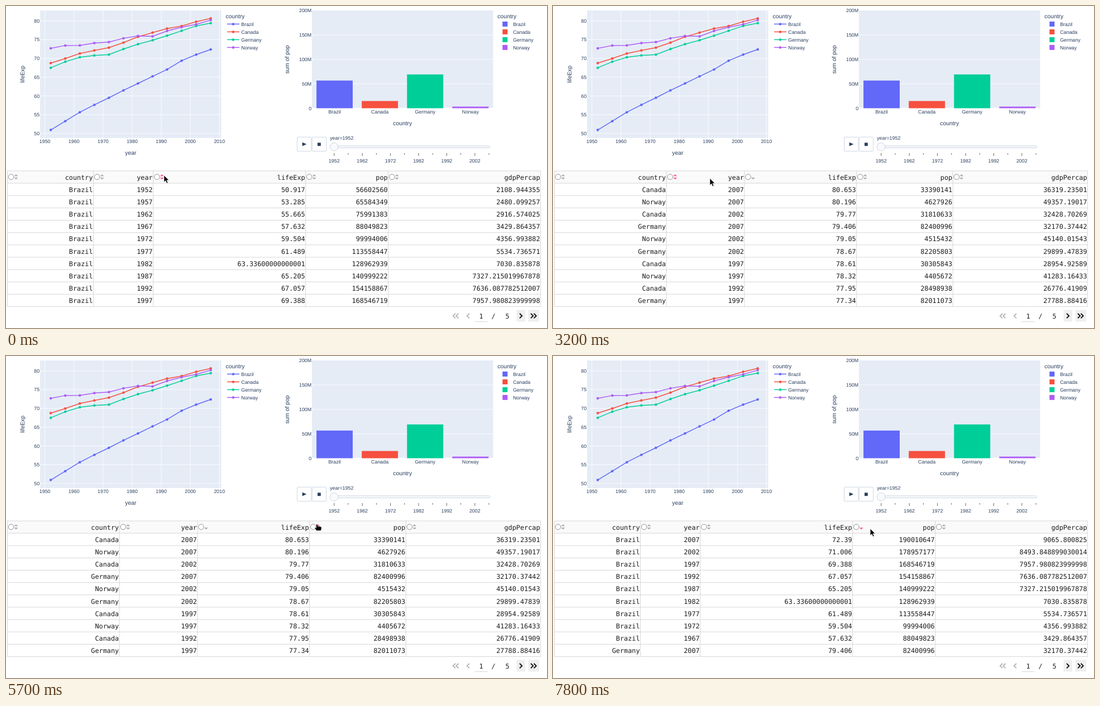
These frames come from a looping animation (969x578 px, 8 s). An HTML page:

```html
<!DOCTYPE html>
<html lang="en">
<head>
<meta charset="utf-8">
<title>Life expectancy dashboard</title>
<style>
html, body { margin: 0; width: 100%; height: 100%; overflow: hidden; background: #fff; }
svg { display: block; width: 969px; height: 578px; }
text { font-family: "Liberation Sans", Arial, sans-serif; font-size: 8.87px; fill: #2a3f5f; text-rendering: geometricPrecision; }
.title { font-size: 10.35px; }
.mono text { font-family: "DejaVu Sans Mono", monospace; font-size: 11.83px; fill: #1c1c1c; }
</style>
</head>
<body>
<svg viewBox="0 0 969 578">
  <g id="charts"></g>
  <g id="table" class="mono"></g>
  <g id="pager" class="mono"></g>
  <g id="cursor"></g>
</svg>
<script>
const LOOP = 8000, STEP = 100;
const $ = id => document.getElementById(id);

// colour, life expectancy every five years, then population and GDP at the KEYS
const KEYS = [0, 3, 6, 9, 11];
const DATA = {
  Brazil: ['#6268f7', '50.917 53.285 55.665 57.632 59.504 61.489 63.33600000000001 65.205 67.057 69.388 71.006 72.39',
    [56602560, 88049823, 128962939, 168546719, 190010647],
    [2108.944355, 3429.864357, 7030.835878, 7957.980823999998, 9065.800825]],
  Canada: ['#f6503f', '68.75 69.96 71.3 72.13 72.88 74.21 75.76 76.86 77.95 78.61 79.77 80.653',
    [14785584, 20819767, 25201900, 30305843, 33390141],
    [11367.16112, 16076.58803, 22898.79214, 28954.92589, 36319.23501]],
  Germany: ['#00ce98', '67.5 69.1 70.3 70.8 71.0 72.5 73.8 74.847 76.07 77.34 78.67 79.406',
    [69145952, 76368453, 78335266, 82011073, 82400996],
    [7144.114393, 14745.62561, 22031.53274, 27788.88416, 32170.37442]],
  Norway: ['#ad5cf5', '72.67 73.44 73.47 74.08 74.34 75.37 75.97 75.89 77.32 78.32 79.05 80.196',
    [3327728, 3786019, 4114787, 4405672, 4627926],
    [10095.42172, 16361.87647, 26298.63531, 41283.16433, 49357.19017]]
};
const FIELDS = ['country', 'year', 'lifeExp', 'pop', 'gdpPercap'];

// constant growth rate between neighbouring keys
function grow(values, i) {
  const k = KEYS.findIndex(key => key >= i);
  if (KEYS[k] === i) return values[k];
  const f = (i - KEYS[k - 1]) / (KEYS[k] - KEYS[k - 1]);
  return values[k - 1] * (values[k] / values[k - 1]) ** f;
}
const gdpPlaces = (name, i) => name !== 'Brazil' ? 5 : i > 6 && i < 11 ? 12 : 6;

const series = Object.entries(DATA).map(([name, [color, life, pop, gdp]]) =>
  ({ name, color, life: life.split(' '), pop, gdp }));
const rows = series.flatMap(({ name, life, pop, gdp }) => life.map((v, i) =>
  [name, 1952 + 5 * i, v, Math.round(grow(pop, i)), grow(gdp, i).toFixed(gdpPlaces(name, i))]));

const text = (x, y, s, anchor = 'start', extra = '') =>
  `<text x="${x}" y="${y}" text-anchor="${anchor}" ${extra}>${s}</text>`;
const rect = (x, y, w, h, fill, extra = '') =>
  `<rect x="${x}" y="${y}" width="${w}" height="${h}" fill="${fill}" ${extra}/>`;
const path = (d, stroke, width = 1, fill = 'none') =>
  `<path d="${d}" stroke="${stroke}" stroke-width="${width}" fill="${fill}"/>`;
const dot = (x, y, r, fill, extra = '') => `<circle cx="${x}" cy="${y}" r="${r}" fill="${fill}" ${extra}/>`;
const big = 'class="title"';
const turned = (x, y, s) => text(0, 0, s, 'middle', `${big} transform="translate(${x} ${y}) rotate(-90)"`);
const legendY = i => 32.4 + 14 * i;

function lineChart() {
  const px = year => 69.7 + (year - 1950) * 5.21;
  const py = v => 228.8 - (v - 50) * 6.737;
  let out = rect(61, 8, 324.5, 229, '#e5ecf6');
  for (let y = 1950; y <= 2010; y += 10)
    out += path(`M${px(y)} 8V237`, '#fff', .8) + text(px(y), 246.4, y, 'middle');
  for (let v = 50; v <= 80; v += 5)
    out += path(`M61 ${py(v)}H385.5`, '#fff', .8) + text(60.2, py(v) + 3.1, v, 'end');
  series.forEach(({ name, color, life }, i) => {
    const pts = life.map((v, k) => [px(1952 + 5 * k), py(v)]), y = legendY(i);
    out += path('M' + pts.join('L'), color, 1.5) + pts.map(p => dot(...p, 2.25, color)).join('');
    out += path(`M396 ${y}H418`, color, 1.5) + dot(407, y, 2.25, color) + text(421.3, y + 3.1, name);
  });
  return out + text(393.6, 21.6, 'country', 'start', big) +
    text(223.3, 266.8, 'year', 'middle', big) + turned(32.5, 122.5, 'lifeExp');
}

function barChart() {
  const py = m => 183.5 - m * .8775;
  let out = rect(548, 8, 324.5, 175.5, '#e5ecf6');
  for (let m = 0; m <= 200; m += 50) {
    if (m < 200) out += path(`M548 ${py(m)}H872.5`, '#fff', m ? .8 : 1.5);
    out += text(547.2, py(m) + 3.2, m ? m + 'M' : 0, 'end');
  }
  series.forEach(({ name, color, pop }, i) => {
    const m = pop[0] / 1e6, x = 556.1 + 81.1 * i, y = legendY(i);
    out += rect(x, py(m), 64.9, m * .8775, color) + text(x + 32.4, 193.3, name, 'middle');
    out += rect(889.3, y - 4.5, 9, 9, color) + text(908.2, y + 3.1, name);
  });
  return out + text(880.3, 21.6, 'country', 'start', big) +
    text(710.2, 213.7, 'country', 'middle', big) + turned(507, 96, 'sum of pop');
}

function slider() {
  const edge = 'stroke="#bec8d9" stroke-width=".75"';
  let out = '';
  for (const x of [521.5, 548.3]) out += rect(x, 235.3, 25.4, 25.4, '#fff', `rx="1.5" ${edge}`);
  out += path('M530.7 244.7L538.3 248.1L530.7 251.5Z', 'none', 0, '#2a3f5f') + rect(558, 245.4, 5.8, 5.8, '#2a3f5f');
  out += text(580.2, 239.8, 'year=1952') + rect(581, 250.9, 285.8, 3.8, '#f8fafc', `rx="1.9" ${edge}`);
  out += dot(587.6, 252.8, 7.2, '#f8fafc', edge);
  for (let i = 0; i < 12; i++) {
    const x = 587.8 + 25.2 * i;
    out += path(`M${x} 264v${i % 2 ? 2.9 : 5.2}`, '#333', .75);
    if (i % 2 === 0) out += text(x, 281, 1952 + 5 * i, 'middle');
  }
  return out;
}

function pager() {
  const chevron = (x, dir, color) =>
    path(`M${x - 2 * dir} 552l${4.2 * dir} 4.2l${-4.2 * dir} 4.2`, color, 1.9);
  const label = (x, s) => text(x, 560.7, s, 'middle');
  const light = '#b4b4b4', dark = '#111';
  return rect(914.5, 545.5, 15.5, 21, '#efefef') + rect(935.5, 545.5, 19.5, 21, '#efefef') +
    chevron(803, -1, light) + chevron(808.5, -1, light) + chevron(828, -1, light) +
    chevron(922, 1, dark) + chevron(942, 1, dark) + chevron(947.5, 1, dark) +
    label(851, 1) + label(873, '/') + label(898, 5) + path('M839 566.6H862.5', '#d3d3d3', .9);
}

// columns share the width in proportion to their longest content
const LEFT = 2.5, WIDTH = 955.1, TOP = 296, ROW = 22.14, HEADER_END = TOP + ROW;
const CHAR = 7.125, ICONS = 17, PAD = 3.4;

function makeView(start, col, dir) {
  const sorted = dir ? [...rows].sort((a, b) => dir * (a[col] - b[col])) : rows;
  const page = sorted.slice(0, 10);
  const need = FIELDS.map((name, c) => PAD + Math.max(
    name.length * CHAR + ICONS, ...page.map(r => String(r[c]).length * CHAR)));
  const total = need.reduce((a, b) => a + b);
  const edges = [LEFT];
  for (const w of need) edges.push(edges.at(-1) + w * WIDTH / total);
  return { start, col, dir, page, edges };
}
const VIEWS = [
  makeView(0, -1, 0), makeView(1200, 2, 1), makeView(3200, 2, -1),
  makeView(6100, 3, 1), makeView(7800, 3, -1)
];

function table({ col, dir, page, edges }, hover) {
  let grid = '';
  for (let i = 0; i <= 11; i++) grid += `M2 ${TOP + ROW * i}H958`;
  for (const x of edges) grid += `M${x} ${TOP}V${TOP + ROW * 11}`;
  let out = rect(LEFT, TOP, WIDTH, ROW, '#fafafa') + path(grid, '#d3d3d3', .9);
  [FIELDS, ...page].forEach((line, i) => line.forEach((v, c) => {
    out += text(edges[c + 1] - 1, 311.7 + ROW * i, v, 'end');
  }));
  FIELDS.forEach((name, c) => {
    const x = edges[c], color = c === hover ? '#ff5fa8' : '#b0b0b0', own = c === col ? dir : 0;
    out += dot(x + 6.6, 306.8, 4.8, '#fff', 'stroke="#777" stroke-width=".8"');
    if (own >= 0) out += path(`M${x + 12} 305.6l3.5 -3.6l3.5 3.6Z`, 'none', 0, color);
    if (own <= 0) out += path(`M${x + 12} 308l3.5 3.6l3.5 -3.6Z`, 'none', 0, color);
  });
  return out;
}

// pointer moves: start, end, x, y, easing power
const MOVES = [
  [0, 1, 283, 304], [300, 600, 280, 306], [1600, 2000, 281, 325, 1.2], [2000, 2400, 281, 309.5],
  [2700, 2800, 280, 310], [2900, 3000, 281, 309.5], [3500, 3800, 305, 310], [4000, 4800, 483, 320, 3],
  [5000, 5700, 557, 302, .7], [6400, 6900, 574, 313], [7100, 7500, 568.2, 310]
];
const ARROW = path('M0 0V12.2L2.9 9.5L5 14.2L7 13.3L5 8.8H8.8Z', '#fff', .6, '#000');
const HAND = path('M-1.4 .8Q0 -.9 1.4 .8V3.6Q2.8 2.7 3.8 3.9Q5.2 3.2 6 4.4Q7.6 4 8 5.6' +
  'V8.4L6.8 11.6H-.6L-3.8 7.4Q-4.2 5.6 -2.6 5.8L-1.4 6.8Z', '#fff', .6, '#000');

function pointer(t) {
  const i = MOVES.findLastIndex(m => m[0] <= t);
  const [start, end, x, y, power = 1] = MOVES[i];
  const [, , fromX, fromY] = MOVES[Math.max(0, i - 1)];
  const k = Math.min(1, (t - start) / (end - start)) ** power;
  return { x: fromX + (x - fromX) * k, y: fromY + (y - fromY) * k };
}

let shown = '';
function draw(time) {
  const t = Math.floor(time % LOOP / STEP) * STEP;
  const { x, y } = pointer(t);
  const view = VIEWS.findLast(v => v.start <= t);
  const hover = y < HEADER_END ? view.edges.findLastIndex(e => e <= x) : -1;
  const offset = x - view.edges[hover];
  const overIcon = offset >= 12 && offset <= 17;
  const key = view.start + ':' + hover;
  if (key !== shown) {
    shown = key;
    $('table').innerHTML = table(view, hover);
  }
  $('cursor').innerHTML = overIcon ? HAND : ARROW;
  $('cursor').setAttribute('transform', `translate(${x} ${y})`);
}

$('charts').innerHTML = lineChart() + barChart() + slider();
$('pager').innerHTML = pager();
const start = performance.now();
function tick() {
  draw(performance.now() - start);
  requestAnimationFrame(tick);
}
tick();
</script>
</body>
</html>
```
